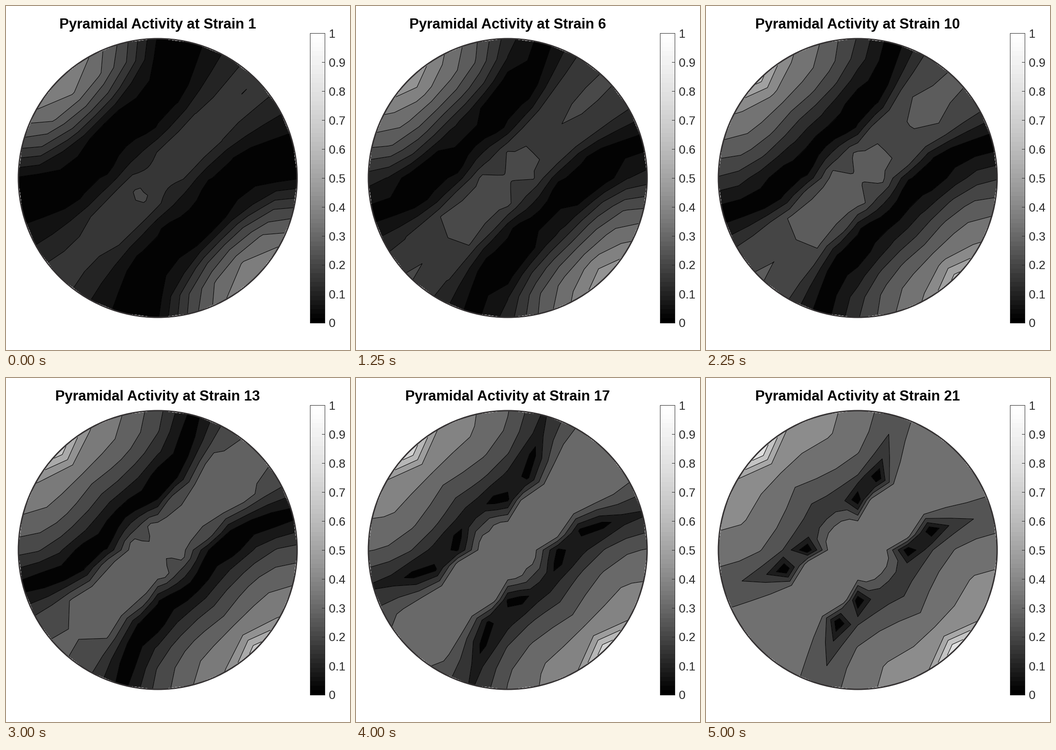
Animation of 748x748 px, one loop 5250 ms. Source, as a matplotlib script:

```python
import numpy as np
import matplotlib.pyplot as plt
from matplotlib.animation import FuncAnimation
from matplotlib.patches import Circle, Rectangle

SIZE, DPI = 748, 100
PX = 72 / DPI
CX, CY, R = 330, 374, 303
STEPS = 21
FONT = "Liberation Sans"
DARK = "#262626"
KEYS = [1, 4, 10, 21]

# Equal-area projection of a 15 degree grid of directions
tilt = np.radians(np.arange(0, 91, 15))[:, None]
phi = np.radians(np.arange(0, 361, 15))
rho = R * np.sqrt(2) * np.sin(tilt / 2)
X = CX + rho * np.cos(phi)
Y = CY - rho * np.sin(phi)

# Direction cosines along (Q) and across (P) the diagonal ridge
Q = np.sin(tilt) * np.cos(phi - np.pi / 4)
P = np.abs(np.sin(tilt) * np.sin(phi - np.pi / 4))


def step_size(s):
    return np.interp(s, KEYS, [0.07, 0.063, 0.09, 0.11])


def activity(s):
    """A wavy central ridge, a valley on each side and two rising flanks."""
    e = (s - 1) / (STEPS - 1)

    waves = 0.12 + 0.2 * np.cos(2 * np.pi * (np.degrees(np.arcsin(Q)) + 15) / 95)
    crest = step_size(s) * (np.interp(s, KEYS, [3.7, 4.0, 4.02, 4.5]) + waves)
    shoulder = 0.12 + 0.14 * np.sqrt(e)
    foot = 0.45 - 0.094 * e
    ridge = crest * np.clip((foot - P) / (foot - shoulder), 0, 1)

    start = 0.67 - 0.316 * e
    rise = np.clip((P - start) / (1 - start), 0, 1) ** (1 - 0.55 * e ** 2)
    skew = 1 + np.sqrt(e) * (1 - P ** 8) * (0.5 * np.minimum(abs(Q), 0.6) - 0.2)
    flank = (0.55 + 0.07 * e) * rise * skew + 0.38 * e * P ** 60

    return np.maximum(ridge + flank, 0.01 + 0.03 * (1 - e))


fig = plt.figure(figsize=(SIZE / DPI, SIZE / DPI), dpi=DPI, facecolor="white")
ax = fig.add_axes([0, 0, 1, 1])
ax.axis("off")

ax.add_patch(Circle((CX, CY), R, fill=False, ec="#333031", lw=3 * PX, zorder=5))
title = ax.text(CX, 49, "", ha="center", va="baseline", family=FONT,
                weight="bold", size=31.1 * PX, color="black")

# Colour bar
left, right, top, bottom = 661, 693, 59, 689
ramp = np.linspace(1, 0, 64)[:, None]
ax.imshow(ramp + 0.14 * np.sin(np.pi * ramp), cmap="gray", vmin=0, vmax=1,
          extent=(left, right, bottom, top), aspect="auto",
          interpolation="nearest")
ax.add_patch(Rectangle((left, top), right - left, bottom - top, fill=False,
                       ec=DARK, lw=PX, zorder=4))
for i in range(11):
    y = bottom - (bottom - top) * i / 10
    ax.plot([right - 6, right], [y, y], color=DARK, lw=PX, zorder=4)
    ax.text(702, y + 9.5, f"{i / 10:g}", va="baseline", family=FONT,
            size=26 * PX, color=DARK)
ax.set_xlim(0, SIZE)
ax.set_ylim(SIZE, 0)

drawn = []


def update(i):
    s = i + 1
    while drawn:
        drawn.pop().remove()
    d = step_size(s)
    u = np.clip(activity(s) / d, 0, 8.99)
    shades = [str(min(max(k * d, 0.01), 1)) for k in range(9)]
    drawn.append(ax.contourf(X, Y, u, levels=[-1, *range(1, 9), 10],
                             colors=shades, zorder=2))
    drawn.append(ax.contour(X, Y, u, levels=range(1, 9), colors="black",
                            linewidths=1.1 * PX, zorder=3))
    title.set_text(f"Pyramidal Activity at Strain {s}")
    return []


anim = FuncAnimation(fig, update, frames=STEPS, init_func=lambda: [],
                     interval=250, repeat=True, repeat_delay=0, blit=False)
plt.show()
```
